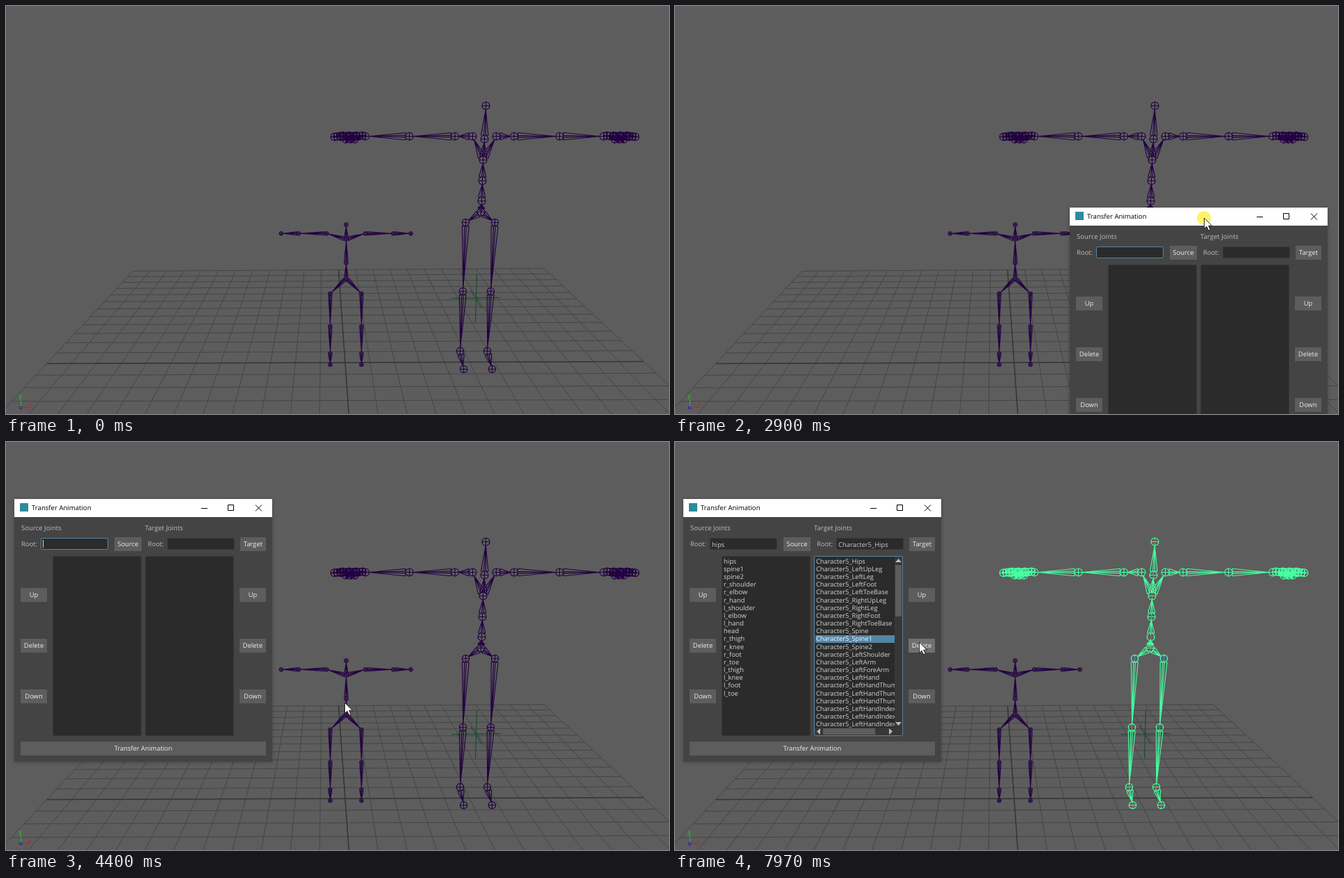
Write an HTML page with a canvas that moves like this. It is 954x587 px and loops after 8000 ms.

```html
<!DOCTYPE html>
<html lang="en">
<head>
<meta charset="utf-8">
<title>Joint transfer</title>
<style>
  html, body { margin: 0; width: 100%; height: 100%; overflow: hidden; background: #5d5d5d; }
  body { position: relative; font: 9.4px/12px 'Open Sans', 'Noto Sans', sans-serif; text-rendering: geometricPrecision; }
  canvas, #win, #ptr { position: absolute; left: 0; top: 0; }
  #win { width: 371px; height: 378px; background: #444; color: #bbb; box-shadow: 0 1px 5px rgba(0,0,0,.28); }
  #win div { position: absolute; box-sizing: border-box; white-space: pre; }
  #win .bar { left: 0; top: 0; width: 371px; height: 26px; background: #fff; color: #000; }
  .bar div { left: 25px; top: 7px; font-size: 9.6px; }
  .bar i { position: absolute; left: 8px; top: 6px; width: 12px; height: 12px; background: #2a8c9c; }
  .bar svg { position: absolute; left: 269px; top: 8px; }
  .off div, .off svg { color: #999; }
  #win .btn { height: 20px; line-height: 20px; background: #5d5d5d; color: #eee; text-align: center; }
  #win .field { top: 56px; width: 97px; height: 17px; padding-left: 2px; line-height: 15px; background: #2b2b2b; border: 1px solid #383838; border-radius: 2px; color: #ccc; }
  #win .list { top: 82px; width: 128px; height: 259px; background: #2b2b2b; border: 1px solid #383838; border-radius: 2px; color: #d4d4d4; overflow: hidden; }
  #win .focus { border-color: #5285a6; }
  .rows div { left: 1px; width: 114px; height: 11px; padding-left: 1px; line-height: 10px; overflow: hidden; }
  #tRows { font-size: 9.25px; }
  #win .on { background: #5285a6; color: #fff; }
  .rows svg { position: absolute; left: 0; top: 0; }
  #win .caret { left: 2px; top: 2px; width: 1px; height: 11px; background: #ddd; }
  #ptr { overflow: visible; }
</style>
</head>
<body>
<canvas id="view" width="954" height="587"></canvas>
<div id="win">
  <div class="bar" id="bar"><i></i><div>Transfer Animation</div>
    <svg width="90" height="10" fill="none" stroke="currentColor"><path d="M0 5.5H9M38.5 .5h8v8h-8zM78 .5l9 9M87 .5l-9 9"/></svg>
  </div>
</div>
<svg id="ptr" width="12" height="20">
  <circle id="press" r="10" fill="#fff04a" fill-opacity=".85"/>
  <path d="M.5 0V15.5L4 12.2L6.6 18L9.2 16.9L6.7 11.2H11.5Z" fill="#fff" stroke="#111" stroke-width=".9"/>
</svg>
<script>
const LOOP = 8000, BEAT = 1333;
const $ = id => document.getElementById(id);
const win = $('win'), g = $('view').getContext('2d');

// ---------- dialog ----------
function add(parent, cls, text, x, y, w) {
  const el = document.createElement('div');
  el.className = cls;
  el.textContent = text;
  if (x !== undefined) el.style.left = x + 'px';
  if (y !== undefined) el.style.top = y + 'px';
  if (w) el.style.width = w + 'px';
  parent.append(el);
  return el;
}

function panel(name, x, rootX, fieldX, btnX, btnW, listX, sideX) {
  add(win, '', name + ' Joints', x, 36).style.fontSize = '9.6px';
  add(win, '', 'Root:', rootX, 59);
  const field = add(win, 'field', '', fieldX);
  add(win, 'btn', name, btnX, 55, btnW);
  const list = add(win, 'list', '', listX);
  const side = ['Up', 'Delete', 'Down'].map((s, i) => add(win, 'btn', s, sideX, 128 + 73 * i, 38));
  return { field, list, side };
}

function fill(list, names, id) {
  const box = add(list, 'rows', '', 0, 0, 126);
  box.id = id;
  box.style.height = '257px';
  return { box, rows: names.map((n, i) => add(box, '', n, 1, 1.6 + i * 11.18)) };
}

const src = panel('Source', 10, 10, 38, 144, 39, 55, 9);
const dst = panel('Target', 188, 192, 220, 325, 37, 188, 324);
add(win, 'btn', 'Transfer Animation', 9, 349, 353);
const caret = add(src.field, 'caret', '');
const rootText = [add(src.field, '', 'hips', 2, 1), add(dst.field, '', 'Character5_Hips', 2, 1)];

const arm = s => ['shoulder', 'elbow', 'hand'].map(n => s + n);
const leg = s => ['thigh', 'knee', 'foot', 'toe'].map(n => s + n);
const srcList = fill(src.list, ['hips', 'spine1', 'spine2', ...arm('r_'), ...arm('l_'), 'head', ...leg('r_'), ...leg('l_')], 'sRows');

const legs = s => ['UpLeg', 'Leg', 'Foot', 'ToeBase'].map(n => s + n);
const digit = n => [1, 2, 3].map(i => 'LeftHand' + n + i);
const dstList = fill(dst.list, ['Hips', ...legs('Left'), ...legs('Right'), 'Spine', 'Spine1', 'Spine2',
  'LeftShoulder', 'LeftArm', 'LeftForeArm', 'LeftHand', ...digit('Thumb'), ...digit('Index')].map(n => 'Character5_' + n), 'tRows');
dstList.box.insertAdjacentHTML('beforeend', `<svg width="126" height="257">
  <path d="M115 0h11v257H0V246H115z" fill="#373737"/>
  <rect x="116" y="12" width="9" height="74" fill="#5d5d5d"/><rect x="12" y="247" width="75" height="9" fill="#5d5d5d"/>
  <path d="M116 8l4.5-5 4.5 5zM116 238l4.5 5 4.5-5zM8 247l-5 4.5 5 4.5zM107 247l5 4.5-5 4.5z" fill="#bbb"/></svg>`);

// ---------- viewport ----------
function line(x1, y1, x2, y2) {
  g.moveTo(x1 + .5, y1 + .5);
  g.lineTo(x2 + .5, y2 + .5);
}
function stroke(color, draw, width = 1) {
  g.strokeStyle = color;
  g.lineWidth = width;
  g.beginPath();
  draw();
  g.stroke();
}

// Ground plane: u across, v in depth (0 back edge, 1 middle axis).
function ground(u, v) {
  const far = 1.451 * (1 - v), w = far + v;
  return [((182 + 592 * u) * far + (58 + 859 * u) * v) / w, ((381 - 4 * u) * far + (514 - 3 * u) * v) / w];
}
function drawGrid() {
  const across = v => line(...ground(0, v), ...ground(1, v));
  const deep = u => line(...ground(u, 0), ...ground(u, 2));
  stroke('#454545', () => {
    for (let i = 0; i <= 24; i++) { across(i / 12); deep(i / 24); }
  });
  stroke('#363636', () => { across(1); deep(.5); }, 1.5);
}

function drawMarks() {
  stroke('#134a2c', () => {
    line(677, 385, 675, 455);
    line(668, 408, 684, 434);
    line(641, 420, 712, 419);
  }, 1.1);
  stroke('#20c020', () => line(21, 577, 21, 566));
  stroke('#c02020', () => line(22, 578, 33, 577));
  stroke('#2020b0', () => g.rect(19.5, 576.5, 3, 3));
  g.font = "9px 'Open Sans', sans-serif";
  g.fillStyle = '#20d020';
  g.fillText('y', 18.5, 564);
  g.fillStyle = '#d02020';
  g.fillText('x', 32, 577);
}

function joint([x, y], r) {
  g.moveTo(x + r + .5, y + .5);
  g.arc(x + .5, y + .5, r, 0, 7);
  line(x - r, y, x + r, y);
  line(x, y - r, x, y + r);
}
function bone([ax, ay], [bx, by], r) {
  const d = Math.hypot(bx - ax, by - ay) || 1;
  const ux = (bx - ax) / d, uy = (by - ay) / d;
  const px = ax + ux * r, py = ay + uy * r, qx = bx - ux * r, qy = by - uy * r;
  for (const k of [-.95, -.2, .3, .95]) line(px - uy * r * k, py + ux * r * k, qx, qy);
  line(px - uy * r * .95, py + ux * r * .95, px + uy * r * .95, py - ux * r * .95);
}
function chain(pts, r) {
  pts.forEach((p, i) => {
    joint(p, r);
    if (i) bone(pts[i - 1], p, r);
  });
}

const spine = [[683, 296], [684, 280], [685, 251], [686, 221], [688, 191], [690, 143]];
const bigLegs = [
  [[661, 311], [657, 410], [653, 496], [658, 522]],
  [[703, 311], [697, 410], [692, 496], [699, 522]]
];
function bigRig() {
  chain(spine, 5.5);
  joint([683, 291], 3);
  for (const s of [-1, 1]) {
    const pts = [17, 42.5, 108, 171.5].map(d => [688 + s * d, 187]);
    chain(pts, 5.5);
    bone(spine[3], pts[0], 5.5);
    for (let f = 0; f < 4; f++) {
      chain([0, 1, 2, 3].map(j => [688.5 + s * (176 + j * 9.5 + f * 4), 186 + f * .6]), 5.4);
    }
    chain([0, 1, 2].map(j => [688.5 + s * (187 + j * 6.5), 191.5]), 5.2);
  }
  for (const pts of bigLegs) {
    chain(pts, 5.2);
    bone(spine[0], pts[0], 5);
  }
}

// swing 0..1 turns the limbs, lift raises the body.
function smallRig(swing, lift) {
  const up = 11 * lift, turn = deg => deg * swing * Math.PI / 180;
  const at = (x, y) => [x, y - up];
  const chest = at(489, 335), hips = at(489, 391);
  chain([hips, at(489, 369), chest, at(489, 314)], 2.8);
  for (const s of [-1, 1]) {
    const limb = (p, parts) => {
      const out = [p];
      for (const [len, a] of parts) {
        p = [p[0] + s * len * Math.cos(a), p[1] - len * Math.sin(a)];
        out.push(p);
      }
      return out;
    };
    const a = turn(50.3 - s * .8), down = -Math.PI / 2;
    const thigh = down + turn(21.2 - s * 1.2), toe = down + turn(8.5 + s * 1.5);
    const armPts = limb(at(488.7 + s * 27.7, 326.8), [[40.3, a], [25.3, a]]);
    const legPts = limb(at(488.5 + s * 22.5, 413.4), [[47, thigh], [39, thigh], [16, toe]]);
    chain(armPts, 2.6);
    chain(legPts, 2.6);
    bone(chest, armPts[0], 3);
    bone(hips, legPts[0], 3);
  }
}

const PLAIN = '#230042', PICKED = '#45ffa0';
function drawScene(t) {
  g.fillStyle = '#5d5d5d';
  g.fillRect(0, 0, 954, 587);
  drawGrid();
  drawMarks();
  const bigOn = t >= 6240, smallOn = t >= 4690 && !bigOn;
  stroke(bigOn ? PICKED : PLAIN, bigRig, 1.15);
  if (bigOn) {
    stroke('#d0553a', () => [...spine, ...bigLegs.flat()].forEach(([x, y]) => line(x, y - 3, x, y + 3)), .9);
    stroke('#2f50e0', () => [spine[1], ...bigLegs.flatMap(l => l.slice(0, 2))].forEach(([x, y]) => line(x - 4, y, x + 4, y)), .9);
  }
  let swing = 0, lift = 0;
  if (t < 2800) {
    const u = Math.min(t, 2460) / BEAT % 1;
    swing = (1 - Math.cos(u * 2 * Math.PI)) / 2;
    lift = 1 - (2 * u - 1) ** 2;
  }
  stroke(smallOn ? PICKED : PLAIN, () => smallRig(swing, lift), 1.1);
}

// ---------- timeline ----------
function along(path, t) {
  let i = 1;
  while (i < path.length - 1 && path[i][0] < t) i++;
  const [t0, x0, y0] = path[i - 1], [t1, x1, y1] = path[i];
  const k = Math.max(0, Math.min(1, (t - t0) / (t1 - t0)));
  return [x0 + (x1 - x0) * k, y0 + (y1 - y0) * k];
}
const drag = [[2800, 640, 310], [3200, 353, 228], [3600, 80, 153], [3700, 29, 121], [3800, 14, 94], [3900, 12, 82]];
const walk = [[4000, 205, 97], [4400, 487, 375], [4700, 487, 375], [5200, 175, 147], [5450, 175, 147],
  [6000, 683, 295], [6220, 683, 295], [6370, 398, 198], [6500, 398, 198], [6800, 355, 147], [7080, 355, 147],
  [7250, 389, 215], [7450, 258, 284], [7600, 258, 284], [7800, 351, 288]];
const presses = [[2800, 3950], [4590, 4690], [5310, 5420], [6090, 6200], [6970, 7070], [7480, 7590]];

const move = (el, [x, y]) => el.style.transform = `translate(${Math.round(x)}px,${Math.round(y)}px)`;
const show = (el, on) => el.style.visibility = on ? 'inherit' : 'hidden';

function render(time) {
  const t = time < 4600 ? Math.floor(time / 100) * 100 : 4600 + Math.floor((time - 4600) / 93.6) * 93.6;
  drawScene(t);
  const open = t >= 2800, pos = along(drag, t);
  win.style.visibility = $('ptr').style.visibility = open ? 'visible' : 'hidden';
  move(win, pos);
  move($('ptr'), t < 4000 ? [pos[0] + 193, pos[1] + 15] : along(walk, t));
  show($('press'), presses.some(([a, b]) => t >= a && t < b));

  const active = t < 4600 || (t >= 5400 && t < 6100) || t >= 7050;
  const hasSrc = t >= 5420, hasDst = t >= 7060;
  $('bar').classList.toggle('off', !active);
  show(rootText[0], hasSrc);
  show(srcList.box, hasSrc);
  show(rootText[1], hasDst);
  show(dstList.box, hasDst);
  src.field.classList.toggle('focus', t < 4600);
  show(caret, t < 4600 && Math.floor(t / 500) % 2 === 0);
  dst.list.classList.toggle('focus', t >= 7500);
  dstList.rows[10].classList.toggle('on', t >= 7500);
  dst.side[1].style.background = t >= 7960 ? '#707070' : '';
}

function tick() {
  render(performance.now() % LOOP);
  requestAnimationFrame(tick);
}
tick();
</script>
</body>
</html>
```
